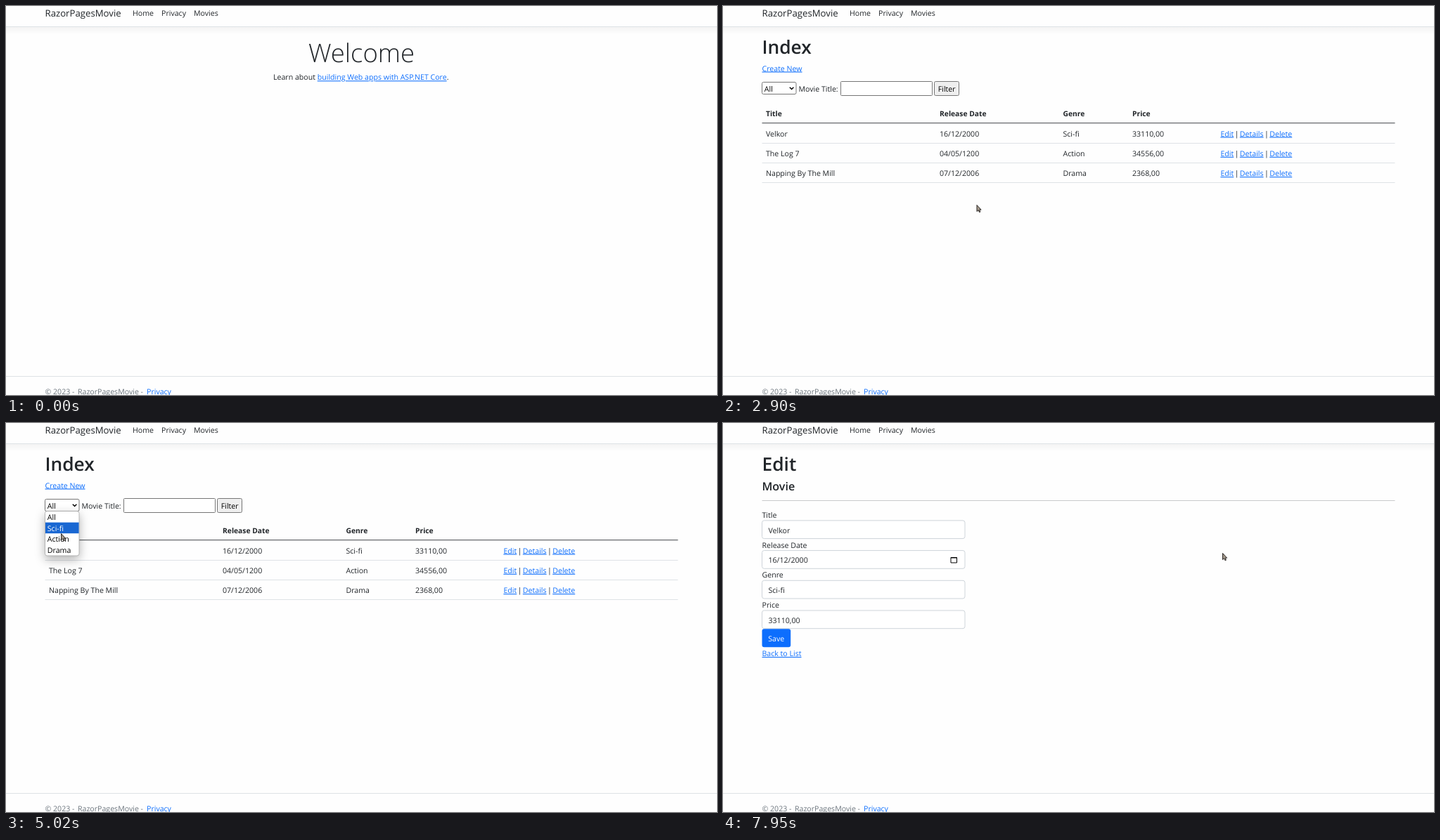
Write an HTML page that moves like this. It is 1011 px wide and 554 px high and loops after 8000 ms.

```html
<!DOCTYPE html>
<html lang="en">
<head>
<meta charset="utf-8">
<title>RazorPagesMovie</title>
<style>
  html, body { margin: 0; width: 100%; height: 100%; overflow: hidden; background: #fefefe; }
  svg { display: block; }
  text {
    font: 10.6px "Open Sans", "Noto Sans", sans-serif;
    fill: #212529; white-space: pre; text-rendering: geometricPrecision;
  }
  .brand { font-size: 13.2px; }
  .hero { font-size: 36.5px; font-weight: 300; text-anchor: middle; }
  .h1 { font-size: 26.3px; font-weight: 600; }
  .h4 { font-size: 16.1px; font-weight: 600; }
  .th { font-size: 10.3px; font-weight: 700; }
  .link { fill: #0d6efd; text-decoration: underline; }
  .plain { fill: #0d6efd; }
  .muted { fill: #6c757d; }
  .light { fill: #fff; }
  .black { fill: #000; }
  .control { fill: #fff; stroke: #767676; }
  .button { fill: #efefef; stroke: #767676; }
  .field { fill: #fff; stroke: #ced4da; }
  .save { fill: #0d6efd; }
  .list { fill: #fff; stroke: #a8a8a8; stroke-width: .8; filter: drop-shadow(0 5px 7px rgba(0, 0, 0, .3)); }
  .bar { fill: #1967d2; }
  .rule { stroke: #dee2e6; }
  .rule.head { stroke: #66696c; stroke-width: 1.3; }
  .rule.hr { stroke: #c9cacb; }
  .icon { fill: none; stroke: #000; }
  #cursor path { stroke: #2b2725; stroke-linejoin: round; fill: #a59a8c; }
  #cursor #ibeam { fill: none; }
</style>
</head>
<body>
<svg width="1011" height="554" viewBox="0 0 1011 554">
  <defs>
    <linearGradient id="fade" x2="0" y2="1">
      <stop offset="0" stop-opacity=".04"/>
      <stop offset="1" stop-opacity="0"/>
    </linearGradient>
  </defs>
  <g id="frame"></g>
  <g id="home"></g>
  <g id="index"></g>
  <g id="edit"></g>
  <g id="menu"></g>
  <g id="cursor">
    <circle id="halo" r="9" fill="#ffec00" opacity=".62"/>
    <path id="arrow" d="M.5.5V9.6L2.6 7.8 4 10.8 5.4 10.2 4.1 7.2H6.6Z"/>
    <path id="hand" d="M-.9.8Q0-.4.9.8V4.2L4.6 5.2Q5.6 5.6 5.4 7L4.6 11H-.6L-3 7.4Q-3.2 6-2 6.2L-.9 7.2Z"/>
    <path id="ibeam" d="M-1.8-4.5H1.8M0-4.5V4.5M-1.8 4.5H1.8"/>
  </g>
</svg>
<script>
const LEFT = 55.5, RIGHT = 955.5, WIDTH = 1011;
const MENU_TOP = 126, MENU_RIGHT = 104, OPTION = 15.6;

const $ = id => document.getElementById(id);
const text = (x, y, str, cls = '') => `<text x="${x}" y="${y}" class="${cls}">${str}</text>`;
const span = (str, cls = '', dx = 0) => `<tspan class="${cls}" dx="${dx}">${str}</tspan>`;
const rect = (x, y, w, h, cls, r = 0) =>
  `<rect x="${x}" y="${y}" width="${w}" height="${h}" class="${cls}" rx="${r}"/>`;
const rule = (y, cls = '', x1 = LEFT, x2 = RIGHT) =>
  `<path class="rule ${cls}" d="M${x1} ${y}H${x2}"/>`;

const movies = [
  ['Velkor', '16/12/2000', 'Sci-fi', '33110,00'],
  ['The Log 7', '04/05/1200', 'Action', '34556,00'],
  ['Napping By The Mill', '07/12/2006', 'Drama', '2368,00']
];
const heads = ['Title', 'Release Date', 'Genre', 'Price'];
const options = ['All', 'Sci-fi', 'Action', 'Drama'];
const columns = [61, 308, 483.5, 582];
const cells = (values, y, cls) => values.map((v, i) => text(columns[i], y, v, cls)).join('');

$('frame').innerHTML =
  text(LEFT, 14.8, 'RazorPagesMovie', 'brand') +
  text(180, 14, 'Home' + span('Privacy', '', 11) + span('Movies', '', 11)) +
  rule(29.5, '', 0, WIDTH) +
  `<rect y="30" width="${WIDTH}" height="11" fill="url(#fade)"/>` +
  rule(527.5, '', 0, WIDTH) +
  text(LEFT, 553.3, '© 2023 -' + span('RazorPagesMovie -', '', 4.5), 'muted') +
  text(200, 553.3, 'Privacy', 'plain');

$('home').innerHTML =
  text(WIDTH / 2, 80, 'Welcome', 'hero') +
  text(380, 105.3, 'Learn about ' + span('building Web apps with ASP.NET Core', 'link') + '.');

const tableRow = (movie, i) => {
  const y = 185.5 + i * 28.3;
  const links = ['Edit', 'Details', 'Delete'].map(s => span(s, 'link', 1.4));
  return cells(movie, y) + text(706, y, links.join(span('|', '', 1.4))) +
    rule(195.5 + i * 28);
};

$('index').innerHTML =
  text(LEFT, 68, 'Index', 'h1') + text(LEFT, 92.5, 'Create New', 'link') +
  rect(LEFT, 108.5, 48.5, 17, 'control', 2) + text(58.8, 121.7, 'All', 'black') +
  '<path class="icon" d="M94.8 115.8l2.8 2.8 2.8-2.8" stroke-width="1.4"/>' +
  text(107.5, 121.7, 'Movie Title:') + rect(167.5, 107.5, 130, 20, 'control', 1) +
  rect(300.5, 107.5, 35, 20, 'button', 2) + text(305.8, 121.7, 'Filter', 'black') +
  cells(heads, 157.3, 'th') + rule(166.7, 'head') +
  movies.map(tableRow).join('');

const formRow = (label, i) => {
  const y = 138.9 + i * 42.7;
  return text(LEFT, y - 3.9, label) + rect(LEFT, y, 288.5, 25.7, 'field', 3) +
    text(64.5, y + 17.7, movies[0][i]);
};

$('edit').innerHTML =
  text(LEFT, 68, 'Edit', 'h1') + text(LEFT, 95.8, 'Movie', 'h4') + rule(110.5, 'hr') +
  heads.map(formRow).join('') +
  '<path class="icon" d="M324 191.5h8.5v7.5H324zM324 192h8.5"/>' +
  rect(LEFT, 293.2, 40.7, 26, 'save', 3) + text(64.3, 310.8, 'Save', 'light') +
  text(LEFT, 332, 'Back to List', 'link');

function drawMenu(hover) {
  $('menu').innerHTML =
    rect(LEFT, MENU_TOP - .5, 48.5, 63.5, 'list', 3) +
    rect(56, MENU_TOP + hover * OPTION, 47.6, OPTION, 'bar') +
    options.map((o, i) => text(58.8, MENU_TOP + 12.1 + i * OPTION, o, i === hover ? 'light' : 'black')).join('');
}

// Where the pointer rests or turns; it eases from one stop to the next.
const stops = [
  { at: 320, x: 972, y: 535, shape: 'arrow' },
  { at: 760, x: 250, y: 21, shape: 'arrow' },
  { at: 1100, x: 805, y: 292, shape: 'arrow' },
  { at: 1760, x: 291, y: 14, shape: 'hand', until: 2100 },
  { at: 2900, x: 360.5, y: 283, shape: 'arrow' },
  { at: 3700, x: 206, y: 124.5, shape: 'ibeam' },
  { at: 4240, x: 82, y: 112, shape: 'arrow', until: 4570 },
  { at: 5130, x: 76, y: 180, shape: 'arrow' },
  { at: 5808, x: 200.5, y: 73.5, shape: 'arrow' },
  { at: 6610, x: 738, y: 192, shape: 'arrow' },
  { at: 6820, x: 716.5, y: 183, shape: 'hand', until: 7800 },
  { at: 7930, x: 710, y: 185, shape: 'arrow' }
];
const presses = [1800, 4240, 5850, 6860];

const show = (id, on) => { $(id).style.display = on ? '' : 'none'; };
const between = (t, from, to) => t >= from && t < to;

// The screen is refreshed at a steady beat.
const refresh = t => t < 320 ? 0 : t - (t - 320) % 112;

function pointerAt(t) {
  const i = stops.findLastIndex(s => s.at <= t);
  if (i < 0) return null;
  const a = stops[i], b = stops[i + 1], leave = a.until || a.at;
  if (!b || t <= leave) return a;
  const k = (t - leave) / (b.at - leave), ease = k * k * (3 - 2 * k);
  return {
    x: a.x + (b.x - a.x) * ease,
    y: a.y + (b.y - a.y) * ease,
    shape: k > .85 || a.shape === 'ibeam' && k < .25 ? (k > .85 ? b : a).shape : 'arrow'
  };
}

function draw(time) {
  const t = refresh(time), p = pointerAt(t);
  show('home', t < 2320);
  show('index', between(t, 2320, 7480));
  show('edit', t >= 7480);

  const open = between(t, 4350, 5920);
  show('menu', open);
  if (open) {
    const row = Math.floor((p.y - MENU_TOP) / OPTION);
    drawMenu(p.x < MENU_RIGHT ? Math.max(0, Math.min(3, row)) : 1);
  }

  show('cursor', p);
  if (!p) return;
  $('cursor').setAttribute('transform', `translate(${p.x} ${p.y})`);
  for (const id of ['arrow', 'hand', 'ibeam']) show(id, id === p.shape);
  show('halo', presses.some(at => between(t, at, at + 280)));
}

const start = performance.now();
function loop() {
  draw((performance.now() - start) % 8000);
  requestAnimationFrame(loop);
}
loop();
</script>
</body>
</html>
```
